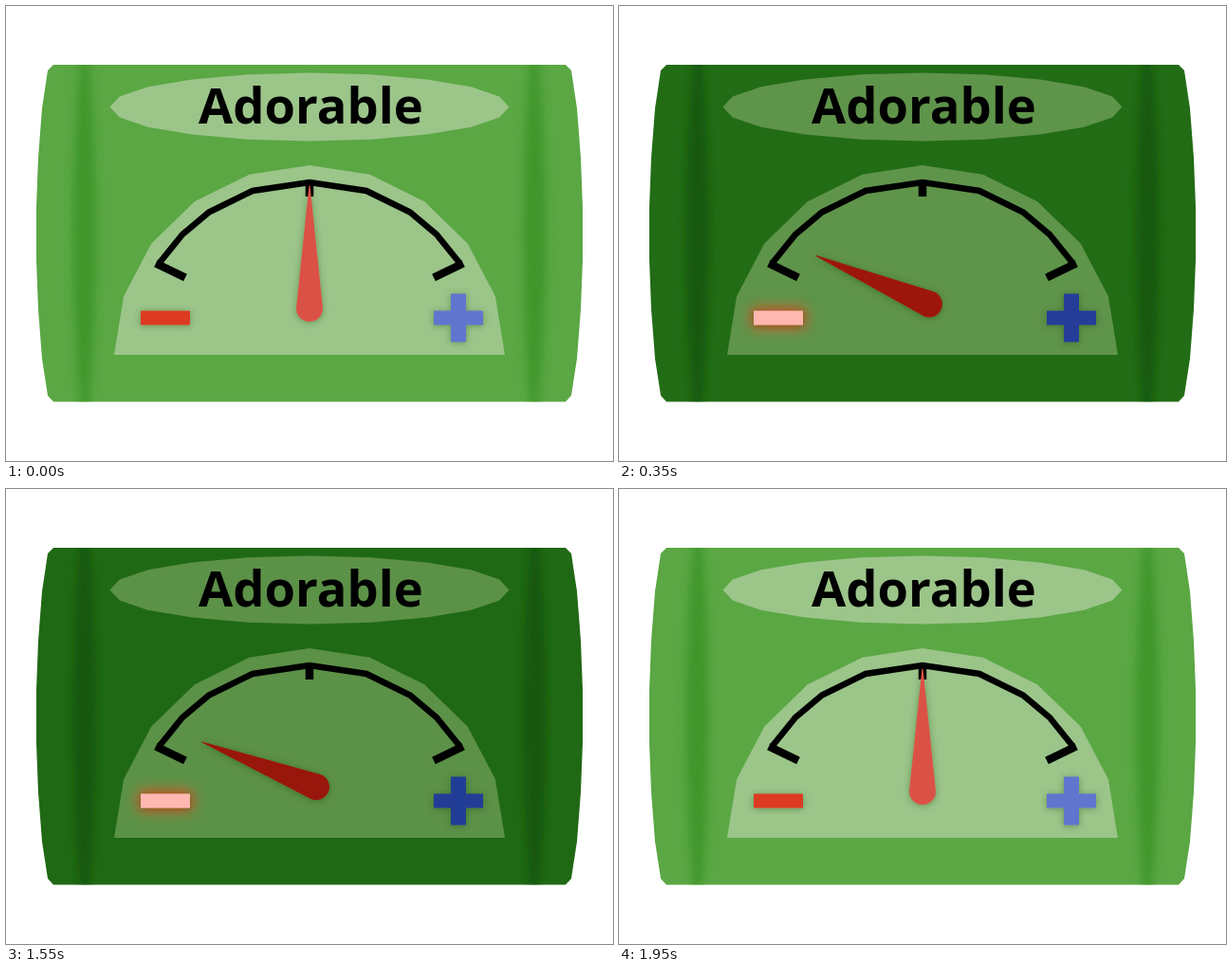
Animation, 640 px wide and 480 px high, one loop 2 s. Source, as an HTML page:

```html
<!DOCTYPE html>
<html lang="en">
<head>
<meta charset="utf-8">
<title>Adorable gauge</title>
<style>
  html, body { margin: 0; width: 100%; height: 100%; overflow: hidden; background: #fff; }
  svg { display: block; width: 640px; height: 480px; }
  text { font: bold 52.5px "Open Sans", "Noto Sans", sans-serif; }
  .body { fill: var(--body); }
  .shade { fill: var(--shade); }
  .panel { fill: var(--panel); }
  .needle { fill: var(--needle); }
  .plus { fill: var(--plus); }
  .minus { fill: var(--minus); }
  .line { fill: none; stroke: #000; }
</style>
</head>
<body>
<svg viewBox="0 0 640 480">
  <defs>
    <path id="case" d="M50 62H590L596 68L602 108L606 160L608 212V268L606 320L602 372L596 411L590 417.500H50L44 411L38 372L34 320L32 268V212L34 160L38 108L44 68Z"/>
    <path id="seam" d="M79 50Q62 240 79 430H87Q103 240 87 50Z"/>
    <clipPath id="inside"><use href="#case"/></clipPath>
    <filter id="soft" x="-100%" y="-10%" width="300%" height="120%"><feGaussianBlur stdDeviation="5"/></filter>
    <filter id="halo" x="-60%" y="-200%" width="220%" height="500%"><feGaussianBlur stdDeviation="7"/></filter>
    <filter id="shadow" x="-40%" y="-40%" width="180%" height="180%">
      <feDropShadow dx="0" dy="1" stdDeviation="3.500" flood-color="#143c08" flood-opacity=".38"/>
    </filter>
  </defs>

  <use href="#case" class="body"/>
  <g clip-path="url(#inside)" class="shade">
    <use href="#seam" filter="url(#soft)"/>
    <use href="#seam" filter="url(#soft)" transform="matrix(-1 0 0 1 640 0)"/>
  </g>

  <polygon id="badge" class="panel"/>
  <text x="203" y="124">Adorable</text>

  <polygon id="dial" class="panel"/>
  <path class="line" stroke-width="6.500" d="M161 272L186 241L214 217.500L260 195L320 186L380 195L426 217.500L454 241L479 272"/>
  <path class="line" stroke-width="8.500" d="M158 271.500L189 286.500M482 271.500L451 286.500M320 185V201"/>

  <rect id="glow" x="140" y="319" width="56" height="20" fill="#ff4a20" filter="url(#halo)"/>
  <rect class="minus" x="142" y="321.500" width="52" height="15" filter="url(#shadow)"/>
  <path class="plus" filter="url(#shadow)" d="M469 303.500h16v18h18v15h-18v18h-16v-18h-18v-15h18z"/>
  <g filter="url(#shadow)">
    <path id="needle" class="needle" d="M-.5 -122H.5L14 7.500A14 14 0 0 1 -14 7.500Z"/>
  </g>
</svg>
<script>
const LOOP = 2000, STEP = 50, SWING = 76.5;
const byId = id => document.getElementById(id);

// Colours at the four swing positions in stops
const stops = [0, 0.417, 0.741, 1];
const palette = {
  body: ['5aa744', '42962f', '2c7d1c', '185c0e'],
  shade: ['3f9729', '2c821b', '1b690f', '0d4a08'],
  panel: ['9cc58a', '86b676', '6fa25b', '4f863b'],
  needle: ['dc5145', 'c93a2b', 'b52215', '860c02'],
  plus: ['6074ce', '4a5fbe', '2f48a8', '1b3489'],
  minus: ['dc3a22', 'ff9c8e', 'ffb1a8', 'ffbdb5']
};

const channels = hex => [0, 2, 4].map(i => parseInt(hex.slice(i, i + 2), 16));

function mix(colors, p) {
  const i = p < stops[1] ? 0 : p < stops[2] ? 1 : 2;
  const k = (p - stops[i]) / (stops[i + 1] - stops[i]);
  const to = channels(colors[i + 1]);
  return `rgb(${channels(colors[i]).map((c, n) => Math.round(c + (to[n] - c) * k))})`;
}

// Points of a 20-sided ellipse, starting at the left and running over the top
function facets(cy, rx, ry, sides) {
  return Array.from({ length: sides + 1 }, (_, i) => {
    const a = i * Math.PI / 10;
    return `${320 - rx * Math.cos(a)},${cy - ry * Math.sin(a)}`;
  }).join(' ');
}

byId('badge').setAttribute('points', facets(106.5, 210.5, 36, 20));
byId('dial').setAttribute('points', facets(368, 206, 200, 10));

const ease = x => {
  x = Math.min(1, Math.max(0, x));
  return x * x * (3 - 2 * x);
};

function draw(now) {
  const t = Math.floor((now % LOOP) / STEP) * STEP;
  const p = ease(t / 450) - ease((t - 1450) / 500);
  for (const name in palette) {
    document.documentElement.style.setProperty('--' + name, mix(palette[name], p));
  }
  byId('needle').setAttribute('transform', `translate(320 311.5) rotate(${-SWING * p})`);
  byId('glow').setAttribute('opacity', p);
}

const start = performance.now();
function tick() {
  draw(performance.now() - start);
  requestAnimationFrame(tick);
}
tick();
</script>
</body>
</html>
```
